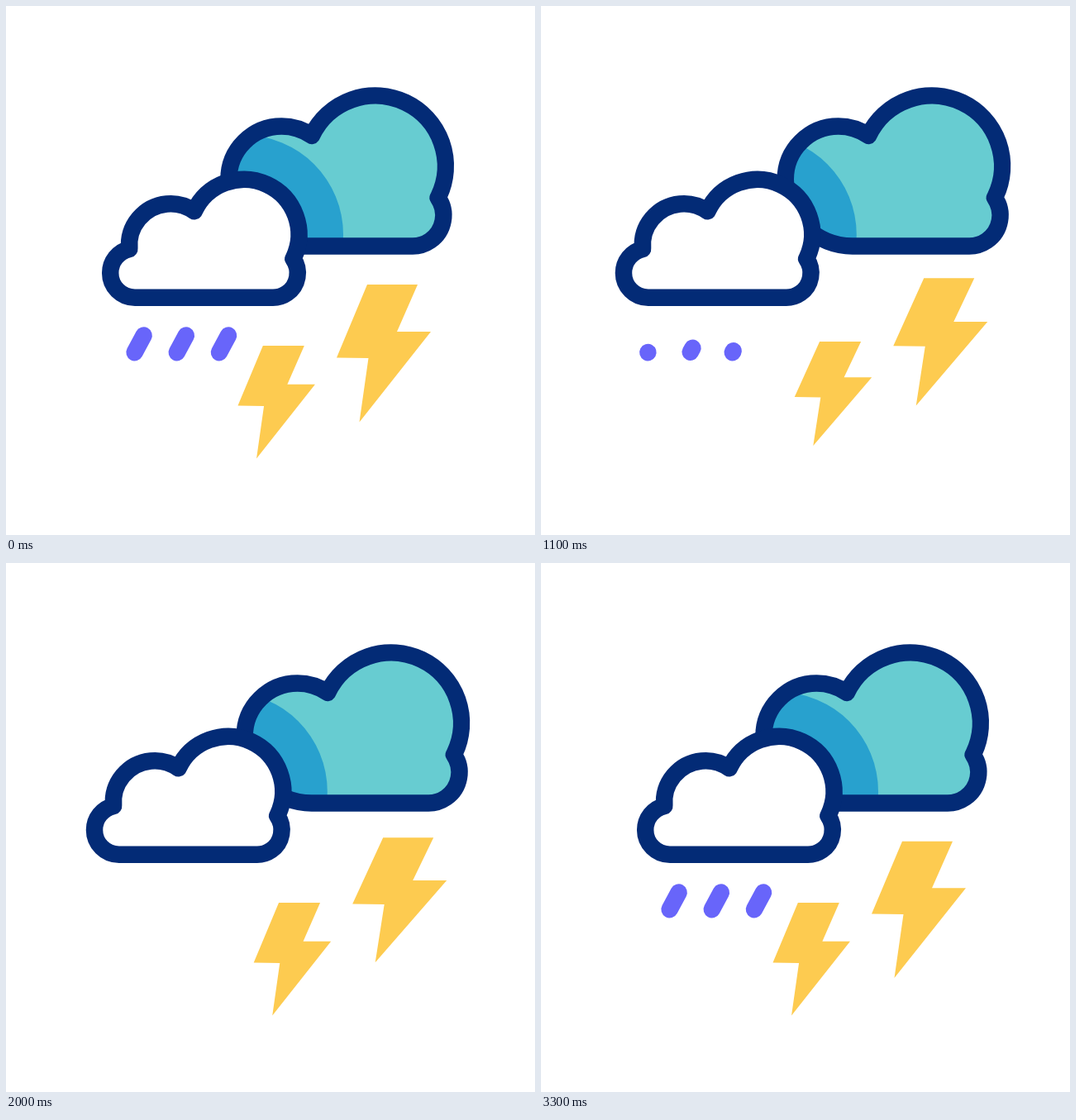
Animation, 640 px wide and 640 px high, one loop 3.62 s. Source, as an HTML page with a canvas:

```html
<!DOCTYPE html>
<html lang="en">
<head>
<meta charset="utf-8">
<title>Thunderstorm</title>
<style>
  html, body { margin: 0; width: 100%; height: 100%; overflow: hidden; background: #fff; }
  canvas { display: block; width: 640px; height: 640px; }
</style>
</head>
<body>
<canvas id="stage" width="640" height="640"></canvas>
<script>
const ctx = document.getElementById('stage').getContext('2d');
const LOOP = 3620, STEP = 20, END = 3300;
const NAVY = '#032b76', TEAL = '#67ccd1', BLUE = '#28a1ce', RAIN = '#6865fa', YELLOW = '#fdcb50';
const LINE = 20.5;

const ease = x => { x = Math.min(1, Math.max(0, x)); return x * x * (3 - 2 * x); };
const mix = (a, b, k) => a + (b - a) * k;
const circle = (x, y, r) => ({ x, y, r });

// Where two neighbouring lobes meet on the outside of a clockwise outline.
function meet(a, b) {
  const dx = b.x - a.x, dy = b.y - a.y, d = Math.hypot(dx, dy);
  const along = (a.r ** 2 - b.r ** 2 + d * d) / (2 * d);
  const out = Math.sqrt(Math.max(0, a.r ** 2 - along ** 2));
  return { x: a.x + (dx * along + dy * out) / d, y: a.y + (dy * along - dx * out) / d };
}

// Lobes run from lower left to lower right; a flat base joins the ends.
function makeCloud(lobes) {
  const path = new Path2D();
  const angle = (c, p) => Math.atan2(p.y - c.y, p.x - c.x);
  lobes.forEach((lobe, i) => {
    const from = i ? angle(lobe, meet(lobes[i - 1], lobe)) : Math.PI / 2;
    const to = lobes[i + 1] ? angle(lobe, meet(lobe, lobes[i + 1])) : Math.PI / 2;
    path.arc(lobe.x, lobe.y, lobe.r, from, to);
  });
  path.closePath();
  return path;
}

const frontLobe = circle(288, 276.3, 66.4);
const frontCloud = makeCloud([
  circle(156, 323, 29.8), circle(199.1, 289.2, 50), frontLobe, circle(323, 323, 29.8)
]);
const backCloud = makeCloud([
  circle(350.5, 209.5, 81), circle(333.5, 209.5, 64),
  circle(446.7, 193.6, 85.1), circle(492, 253.2, 37.3)
]);

const boltShape = [[37, 0], [98, 0], [73, 57], [114, 57], [27.5, 166.4], [38.5, 89], [0, 88.4]];
const bolts = [
  { x: 400, y: 337, size: 1, low: 0.528, delay: 467 },
  { x: 280.5, y: 411, size: 0.82, low: 0.64, delay: 962 }
];
const BOLT_CYCLE = 1400, SHRINK = 467, GROW = 267, SETTLE = 195;
const PEAK = 1.115, LIFT = 24;

// A bolt squashes up towards its cloud, springs past full height and settles.
function boltPose({ low, delay }, t) {
  const p = t < delay ? 0 : (t - delay) % BOLT_CYCLE;
  const squash = ease(p / SHRINK);
  const spring = ease((p - SHRINK) / GROW);
  const settle = ease((p - SHRINK - GROW) / SETTLE);
  return {
    stretch: mix(mix(mix(1, low, squash), PEAK, spring), 1, settle),
    lift: LIFT * squash * (1 - spring)
  };
}

function drawBolt(bolt, t) {
  const { stretch, lift } = boltPose(bolt, t);
  ctx.beginPath();
  for (const [x, y] of boltShape)
    ctx.lineTo(bolt.x + x * bolt.size, bolt.y - lift + y * bolt.size * stretch);
  ctx.fillStyle = YELLOW;
  ctx.fill();
}

const DROPS = 3, RAIN_CYCLE = 700, FALL = 400, LAG = 100, LAST_RUN = 4;

// The head of a drop runs down its line, followed by the tail.
function drawDrop(i, t) {
  const first = -90 + 62 * (2 * i % DROPS);
  const run = Math.min(LAST_RUN, Math.max(0, Math.floor((t - first) / RAIN_CYCLE)));
  const p = t - first - run * RAIN_CYCLE;
  const head = run ? ease(p / FALL) : 1;
  const tail = run < LAST_RUN ? ease((p - LAG) / FALL) : 0;
  if (head <= 0 || tail >= 1) return;
  const at = k => [166.6 + 51.2 * i - 11 * k, 398.6 + 20.5 * k];
  ctx.beginPath();
  ctx.moveTo(...at(tail));
  ctx.lineTo(...at(head + 0.001));
  ctx.strokeStyle = RAIN;
  ctx.stroke();
}

function drawCloud(path, fill, shade) {
  ctx.fillStyle = fill;
  ctx.fill(path);
  if (shade) {
    ctx.save();
    ctx.clip(path);
    ctx.beginPath();
    ctx.arc(shade.x, shade.y, shade.r, 0, 2 * Math.PI);
    ctx.fillStyle = BLUE;
    ctx.fill();
    ctx.restore();
  }
  ctx.strokeStyle = NAVY;
  ctx.stroke(path);
}

function shifted(dx, draw) {
  ctx.save();
  ctx.translate(dx, 0);
  draw();
  ctx.restore();
}

const DRIFT = 38.4, HALF = 800, DRIFT_END = 4 * HALF;

function drift(t) {
  const p = Math.min(t, DRIFT_END) % (2 * HALF) / HALF;
  return DRIFT * ease(1 - Math.abs(1 - p));
}

function render(t) {
  const dx = drift(t);
  ctx.fillStyle = '#fff';
  ctx.fillRect(0, 0, 640, 640);
  ctx.lineCap = ctx.lineJoin = 'round';
  ctx.lineWidth = LINE;

  shifted(dx, () => {
    drawCloud(backCloud, TEAL, circle(frontLobe.x - 2 * dx, frontLobe.y, 120));
    bolts.forEach(bolt => drawBolt(bolt, t));
  });
  shifted(-dx, () => {
    drawCloud(frontCloud, '#fff');
    for (let i = 0; i < DROPS; i++) drawDrop(i, t);
  });
}

const origin = performance.now();
function tick() {
  const t = (performance.now() - origin) % LOOP;
  render(Math.min(END, Math.floor(t / STEP) * STEP));
  requestAnimationFrame(tick);
}
tick();
</script>
</body>
</html>
```
